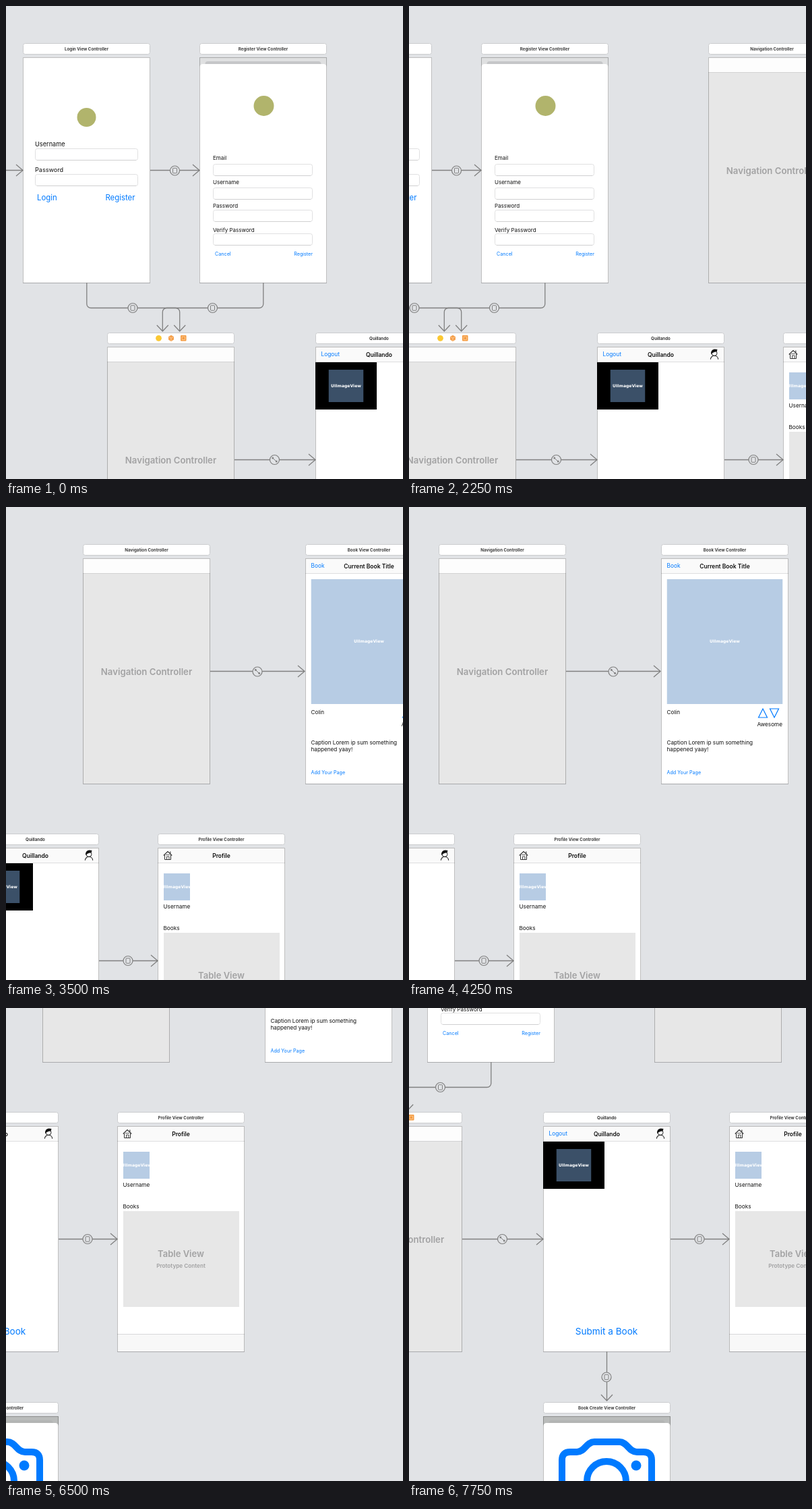
These frames come from a looping animation (589 by 701 pixels, 8000 ms). An HTML page with a canvas:

```html
<!DOCTYPE html>
<html lang="en">
<head>
<meta charset="utf-8">
<title>Storyboard pan</title>
<style>
html, body { margin: 0; width: 100%; height: 100%; overflow: hidden; background: #e1e3e6; }
canvas { display: block; width: 589px; height: 701px; }
</style>
</head>
<body>
<canvas id="stage"></canvas>
<script>
const W = 589, H = 701, LOOP = 8000;
const canvas = document.getElementById('stage');
const ctx = canvas.getContext('2d');
const dpr = window.devicePixelRatio || 1;
canvas.width = W * dpr;
canvas.height = H * dpr;

const BG = '#e1e3e6', BLUE = '#007aff', EDGE = 'rgba(0, 0, 0, 0.25)', WIRE = '#808080';
const PLACEHOLDER = '#e7e7e7', DIM = '#a2a2a3', IMAGE = '#b7cce4', BAR = '#fafafa';
const SANS = 'Inter, sans-serif', WIDE = '"DejaVu Sans", sans-serif';
const APP = 'Quillando';
const PW = 188, PH = 334;

// Camera stops: time, x, y. The view jumps from one to the next.
const stops = [
  [0, 0, 0], [750, -10, 0], [1000, -20, 0], [1250, -40, 0], [1500, -65, 0],
  [1750, -100, 0], [2000, -140, 0], [2250, -180, 0], [2500, -235, 0],
  [2750, -295, 0], [3000, -350, 0], [3250, -430, 0], [3500, -510, 0],
  [3750, -560, 0], [4250, -580, 0], [4750, -580, -40], [5000, -580, -110],
  [5250, -580, -160], [5750, -580, -190], [6000, -575, -240], [6250, -570, -290],
  [6500, -570, -330], [6750, -560, -430], [7000, -480, -430],
  [7500, -360, -380], [7750, -260, -330]
];

function text(str, x, y, size, { color = '#111', weight = 400, align = 'left', font = SANS } = {}) {
  ctx.font = `${weight} ${size}px ${font}`;
  ctx.fillStyle = color;
  ctx.textAlign = align;
  ctx.textBaseline = 'alphabetic';
  ctx.fillText(str, x, y + size * 0.36);
}

function fill(x, y, w, h, color) {
  ctx.fillStyle = color;
  ctx.fillRect(x, y, w, h);
}

function box(x, y, w, h, r, color, edge) {
  ctx.beginPath();
  ctx.roundRect(x + 0.5, y + 0.5, w, h, r);
  ctx.fillStyle = color;
  ctx.fill();
  if (edge) stroke(edge, 1);
}

function disc(x, y, r, color) {
  ctx.beginPath();
  ctx.arc(x, y, r, 0, Math.PI * 2);
  ctx.fillStyle = color;
  ctx.fill();
}

function stroke(color, width) {
  ctx.strokeStyle = color;
  ctx.lineWidth = width;
  ctx.stroke();
}

function line(points, color = WIRE, width = 1.3, closed = false) {
  ctx.beginPath();
  points.forEach(([x, y]) => ctx.lineTo(x, y));
  if (closed) ctx.closePath();
  stroke(color, width);
}

// Draws a titled screen; the content uses coordinates local to its body.
function scene(x, y, title, content) {
  box(x, y, PW, 16, 3, '#fff', '#cbccce');
  if (title) text(title, x + 94.5, y + 8.7, 6.2, { color: '#3c3c3c', weight: 700, align: 'center' });
  ctx.save();
  ctx.translate(x, y + 21);
  fill(0, 0, PW + 1, PH, '#fff');
  ctx.save();
  ctx.beginPath();
  ctx.rect(0, 0, PW + 1, PH);
  ctx.clip();
  content();
  ctx.restore();
  ctx.strokeStyle = EDGE;
  ctx.lineWidth = 1;
  ctx.strokeRect(0.5, 0.5, PW, PH);
  ctx.restore();
}

function field(x, y, w) {
  box(x, y, w, 17, 3, '#fff', '#e0e0e1');
  fill(x + 3, y + 17, w - 5, 1, '#d0d0d1');
}

function navBar(title, back) {
  fill(0, 0, PW + 1, 22, BAR);
  fill(0, 22, PW + 1, 1, '#dededf');
  if (back) text(back, 8.5, 11.5, 8.3, { color: BLUE });
  if (title) text(title, 94.5, 11.5, 8.5, { weight: 600, align: 'center' });
}

function imageView(x, y, w, h, color) {
  ctx.save();
  ctx.beginPath();
  ctx.rect(x, y, w, h);
  ctx.clip();
  fill(x, y, w, h, color);
  text('UIImageView', x + w / 2, y + h / 2 - 0.3, 6.1,
    { color: '#fff', weight: 700, align: 'center', font: WIDE });
  ctx.restore();
}

function sheet(back, strip) {
  fill(0, 0, PW + 1, 30, back);
  box(8, 5.5, 172, 12, 4, strip);
  ctx.beginPath();
  ctx.roundRect(0, 10, PW + 1, PH, 5);
  ctx.fillStyle = '#fff';
  ctx.fill();
}

function login() {
  disc(94.5, 89, 14, '#b1b46c');
  text('Username', 18, 128.8, 9.2);
  field(18, 135, 152);
  text('Password', 18, 166.8, 9.1);
  field(18, 173, 152);
  text('Login', 21, 208, 11.4, { color: BLUE });
  text('Register', 166.5, 208, 11.4, { color: BLUE, align: 'right' });
}

function register() {
  sheet('#dfe0e1', '#c5c6c8');
  disc(95.5, 72, 15, '#b1b46c');
  [['Email', 149, 158], ['Username', 185, 193], ['Password', 220.3, 226], ['Verify Password', 256.3, 261]]
    .forEach(([label, ly, fy]) => {
      text(label, 20, ly, 8);
      field(20, fy, 147);
    });
  text('Cancel', 23, 291, 7.2, { color: BLUE });
  text('Register', 168, 291, 7.2, { color: BLUE, align: 'right' });
}

function navigation() {
  fill(0, 0, PW + 1, PH, PLACEHOLDER);
  fill(0, 0, PW + 1, 22, '#fdfdfd');
  fill(0, 22, PW + 1, 1, '#d2d2d3');
  text('Navigation Controller', 94.5, 167.8, 13.2, { color: DIM, weight: 600, align: 'center' });
}

function avatar(x, y) {
  ctx.beginPath();
  ctx.arc(x, y - 1.5, 4, 0, Math.PI * 2);
  stroke('#222', 1);
  ctx.beginPath();
  ctx.arc(x, y + 8, 5.7, Math.PI * 1.02, Math.PI * 1.98);
  stroke('#222', 1.1);
  ctx.beginPath();
  ctx.moveTo(x - 5, y);
  ctx.quadraticCurveTo(x - 5.5, y - 7, x + 0.5, y - 7.5);
  ctx.lineTo(x + 4.5, y - 7);
  ctx.lineTo(x + 3.5, y - 3.5);
  ctx.quadraticCurveTo(x - 1, y - 4, x - 5, y);
  ctx.fillStyle = '#111';
  ctx.fill();
}

function house(x, y) {
  line([[x - 6.3, y], [x, y - 6], [x + 6.3, y]], '#333', 1.1);
  line([[x - 4.5, y - 1], [x - 4.5, y + 6], [x + 4.5, y + 6], [x + 4.5, y - 1]], '#333', 1);
  line([[x - 1.5, y + 6], [x - 1.5, y + 1.5], [x + 2, y + 1.5], [x + 2, y + 6]], '#333', 0.9);
  line([[x + 3.8, y - 2.5], [x + 3.8, y - 6]], '#333', 1.1);
  line([[x - 3, y - 1], [x + 3, y - 1]], '#555', 0.9);
}

function home() {
  navBar(APP, 'Logout');
  avatar(174, 11);
  fill(0, 23, 91, 70, '#000');
  imageView(19.5, 34, 52, 48, '#3b5068');
  text('Submit a Book', 94, 304.5, 13.6, { color: BLUE, align: 'center' });
}

function profile() {
  navBar('Profile');
  house(15, 11.5);
  imageView(9, 38, 39, 40, IMAGE);
  text('Username', 8.5, 87, 8.2);
  text('Books', 8.5, 118.8, 8.2);
  fill(9, 126, 172, 142, PLACEHOLDER);
  text('Table View', 94.5, 189.8, 13, { color: DIM, weight: 600, align: 'center' });
  text('Prototype Content', 94.5, 206.8, 8.2, { color: DIM, weight: 600, align: 'center' });
  fill(0, 309, PW + 1, 26, '#f8f8f8');
  fill(0, 308, PW + 1, 1, '#d9d9da');
}

function book() {
  navBar('Current Book Title', 'Book');
  imageView(8.5, 31, 172, 185, IMAGE);
  text('Colin', 8.5, 228, 8.2);
  line([[144.5, 236], [151, 223], [157.5, 236]], BLUE, 1.2, true);
  line([[161.5, 223], [174.5, 223], [168, 236]], BLUE, 1.2, true);
  text('Awesome', 180, 246.5, 8.2, { align: 'right' });
  text('Caption Lorem ip sum something', 8.5, 273, 8.2);
  text('happened yaay!', 8.5, 283, 8.2);
  text('Add Your Page', 8.5, 317.5, 7.2, { color: BLUE });
}

function create() {
  sheet('#babcbb', '#b3b5b4');
  ctx.beginPath();
  ctx.moveTo(28, 94);
  ctx.lineTo(28, 65);
  ctx.quadraticCurveTo(28, 53, 40, 53);
  ctx.lineTo(50, 53);
  ctx.bezierCurveTo(62, 53, 64, 38, 76, 38);
  ctx.lineTo(113, 38);
  ctx.bezierCurveTo(125, 38, 127, 53, 139, 53);
  ctx.lineTo(149, 53);
  ctx.quadraticCurveTo(161, 53, 161, 65);
  ctx.lineTo(161, 128);
  ctx.quadraticCurveTo(161, 140, 149, 140);
  ctx.lineTo(40, 140);
  ctx.quadraticCurveTo(28, 140, 28, 128);
  ctx.closePath();
  stroke(BLUE, 10);
  ctx.beginPath();
  ctx.arc(94, 96, 29, 0, Math.PI * 2);
  stroke(BLUE, 10);
  disc(138, 73, 7.5, BLUE);
}

function arrowRight(x1, x2, y) {
  line([[x1, y], [x2, y]]);
  line([[x2 - 10, y - 8.5], [x2, y], [x2 - 10, y + 8.5]]);
}

function tipDown(x, y) {
  line([[x - 8.5, y - 9], [x, y], [x + 8.5, y - 9]]);
}

function badge(x, y, root) {
  disc(x, y, 7, BG);
  stroke(WIRE, 1.2);
  if (root) {
    line([[x - 2.5, y - 2.5], [x + 2.5, y + 2.5]], WIRE, 1);
    disc(x - 2.7, y - 2.5, 1.4, WIRE);
    disc(x + 2.7, y + 2.5, 1.4, WIRE);
  } else {
    ctx.beginPath();
    ctx.roundRect(x - 3, y - 3.7, 6, 7.4, 0.8);
    stroke(WIRE, 1);
  }
}

function elbow(x1, x2) {
  const y = 447.5;
  ctx.beginPath();
  ctx.moveTo(x1, 410);
  ctx.arcTo(x1, y, x2, y, 6);
  ctx.arcTo(x2, y, x2, 481, 6);
  ctx.lineTo(x2, 482);
  stroke(WIRE, 1.3);
  tipDown(x2, 482);
}

function wires() {
  arrowRight(-60, 25, 243.5);
  arrowRight(214, 287, 243.5);
  badge(250.5, 244);
  elbow(119.8, 257.7);
  elbow(381.8, 232.3);
  badge(188, 447.5);
  badge(306.5, 447.5);
  arrowRight(339, 459, 672.5);
  badge(398.5, 672.5, true);
  arrowRight(648, 735, 672.5);
  badge(691, 672.5);
  arrowRight(813, 953, 243.5);
  badge(883, 244, true);
  line([[553.5, 839], [553.5, 912]]);
  tipDown(553.5, 912);
  badge(553, 877);
}

function dockIcons() {
  disc(226.5, 492.3, 4.4, '#fbc832');
  ctx.beginPath();
  for (let i = 0; i < 6; i++) {
    const a = Math.PI * (i / 3 + 1 / 6);
    ctx.lineTo(245 + 4.6 * Math.cos(a), 492.3 + 4.6 * Math.sin(a));
  }
  ctx.fillStyle = '#f5a04c';
  ctx.fill();
  line([[241.5, 490.3], [245, 492.3], [248.5, 490.3]], '#fbd3a6', 0.8);
  line([[245, 492.3], [245, 496.3]], '#fbd3a6', 0.8);
  box(258.5, 487.5, 8.5, 8.5, 1, '#f59a3e');
  ctx.strokeStyle = '#fbd3a6';
  ctx.lineWidth = 0.8;
  ctx.strokeRect(261, 490, 4.5, 4.5);
}

function draw(t) {
  const [start, x, y] = stops.findLast(s => s[0] <= t);
  ctx.setTransform(dpr, 0, 0, dpr, 0, 0);
  fill(0, 0, W, H, BG);
  ctx.save();
  ctx.translate(x, y);
  scene(25, 55, 'Login View Controller', login);
  scene(287, 55, 'Register View Controller', register);
  scene(624, 55, 'Navigation Controller', navigation);
  scene(954, 55, 'Book View Controller', book);
  scene(150, 484, '', navigation);
  scene(459, 484, APP, home);
  scene(735, 484, 'Profile View Controller', profile);
  scene(459, 914, 'Book Create View Controller', create);
  dockIcons();
  wires();
  ctx.restore();
  if (start === 5250) {
    ctx.beginPath();
    ctx.roundRect(586.5, 199, 6, 228, 3);
    ctx.fillStyle = '#5c5d5f';
    ctx.fill();
  }
}

const begin = performance.now();
function tick() {
  draw((performance.now() - begin) % LOOP);
  requestAnimationFrame(tick);
}
tick();
</script>
</body>
</html>
```
